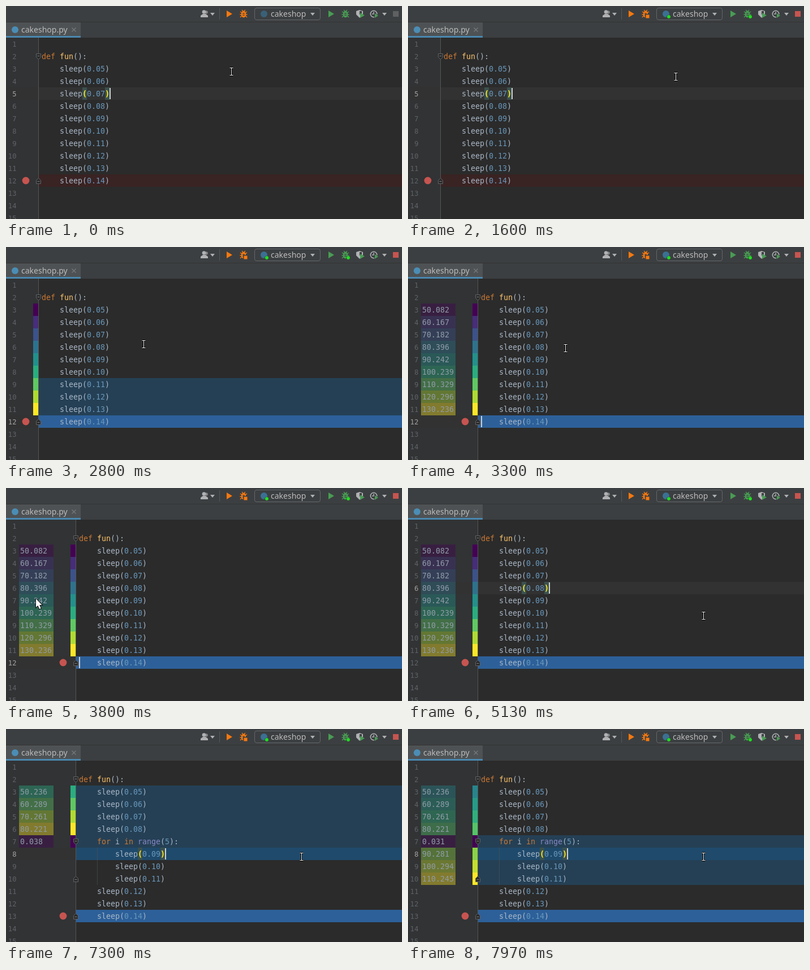
An HTML page with a canvas that plays this animation: 700 px wide and 377 px high, repeating every 8000 ms.

```html
<!DOCTYPE html>
<html lang="en">
<head>
<meta charset="utf-8">
<title>Editor with live line timings</title>
<style>
html, body { margin: 0; width: 100%; height: 100%; overflow: hidden; background: #2b2b2b; }
canvas { display: block; }
</style>
</head>
<body>
<canvas id="stage" width="700" height="377"></canvas>
<script>
const ctx = document.getElementById('stage').getContext('2d');
const LOOP = 8000, ROW = 22, CHAR = 8, GLOW = 500;
const MONO = '"DejaVu Sans Mono", monospace', UI = '"Noto Sans", sans-serif';
const VIRIDIS = ['#440154', '#472d7b', '#3b528b', '#2c728e', '#21918c', '#28ae80', '#5ec962', '#addc30', '#fde725'];
const WORDS = { def: '#cc7832', for: '#cc7832', in: '#cc7832', fun: '#ffc66d', range: '#8888c6' };
const GREY = '#afb1b3', ORANGE = '#f6790f', GREEN = '#499c54', RED = '#c75450';

// Moments of the session, in ms
const T = { debug: 1130, pause: 2700, labels: 3050, newline: 5170, loop: 5330, select: 5570,
  error: 5830, indent: 5930, folds: 6030, valid: 6170, deselect: 6430, resume: 7000 };

// time, row, column
const CARET = [[0, 5, 15], [T.pause, 12, 0], [4500, 8, 15], [5000, 7, 15], [5100, 6, 15], [T.newline, 7, 4],
  [T.loop, 7, 22], [T.select, 10, 15], [T.indent, 10, 19], [6200, 9, 19], [6270, 8, 19]];

// time, x, y
const MOUSE = [[30, 398, 116], [800, 420, 14], [1030, 420, 14], [1600, 473, 125], [2480, 473, 125],
  [2800, 243, 172], [3100, 226, 176], [3500, 330, 182], [3630, 53, 196], [3900, 53, 196], [4330, 522, 226]];

const rowTop = n => 56 + ROW * (n - 1);
const lastBefore = (keys, t) => keys.filter(k => k[0] <= t).pop() || keys[0];

// Turns [row, duration] pairs into a schedule
function schedule(start, steps) {
  return steps.map(([row, ms]) => {
    const step = { row, ms, start, end: start + ms };
    start += ms;
    return step;
  });
}
const firstRun = schedule(1870, [50.082, 60.167, 70.182, 80.396, 90.242, 100.239, 110.329, 120.296, 130.236]
  .map((ms, i) => [i + 3, ms]));
const secondRun = schedule(T.resume, [[3, 50.236], [4, 60.289], [5, 70.261], [6, 80.221],
  [7, 0.038], [8, 90.263], [9, 100.251], [10, 110.272],
  [7, 0.034], [8, 90.254], [9, 100.294], [10, 110.245],
  [7, 0.031], [8, 90.281], [9, 100.266], [10, 110.258]]);

function rect(x, y, w, h, color) {
  ctx.fillStyle = color;
  ctx.fillRect(x, y, w, h);
}
function disc(x, y, r, color) {
  ctx.fillStyle = color;
  ctx.beginPath();
  ctx.arc(x, y, r, 0, 7);
  ctx.fill();
}
function trace(points, close) {
  ctx.beginPath();
  points.forEach(([x, y]) => ctx.lineTo(x, y));
  if (close) ctx.closePath();
}
function poly(points, color) {
  trace(points, true);
  ctx.fillStyle = color;
  ctx.fill();
}
function line(points, color, width = 1) {
  trace(points);
  ctx.strokeStyle = color;
  ctx.lineWidth = width;
  ctx.stroke();
}
function text(str, x, y, color, font) {
  ctx.font = font;
  ctx.fillStyle = color;
  ctx.fillText(str, x, y);
}
const play = (x, y, w, h, color) => poly([[x, y], [x + w, y + h / 2], [x, y + h]], color);
const chevron = (x, y) => poly([[x - 4, y - 2], [x + 4, y - 2], [x, y + 3]], GREY);

function heat(v) {
  const f = Math.min(v, 0.9999) * 8, i = Math.floor(f);
  const part = (hex, k) => parseInt(hex.substr(1 + 2 * k, 2), 16);
  return [0, 1, 2].map(k => Math.round(part(VIRIDIS[i], k) + (f - i) * (part(VIRIDIS[i + 1], k) - part(VIRIDIS[i], k))));
}

function bug(x, color) {
  for (const s of [-1, 1]) {
    line([[x + s * 3, 12], [x + s * 6, 10]], color, 1.5);
    line([[x + s * 3, 15], [x + s * 6.5, 15]], color, 1.5);
    line([[x + s * 3, 17], [x + s * 6, 20]], color, 1.5);
    line([[x + s, 9], [x + s * 3, 7]], color, 1.3);
  }
  ctx.fillStyle = color;
  ctx.beginPath();
  ctx.ellipse(x, 14.5, 4.2, 6, 0, 0, 7);
  ctx.fill();
  rect(x - 2, 12.5, 4, 1.2, '#3c3f41');
  rect(x - 2, 15.5, 4, 1.2, '#3c3f41');
}

function runningDot(x) {
  disc(x, 19, 3.6, '#3c3f41');
  disc(x, 19, 2.9, '#1fe01f');
}

function drawToolbar(running, hover) {
  rect(0, 0, 700, 56, '#3c3f41');
  rect(0, 28, 700, 1, '#323232');

  disc(354, 11, 2.8, '#87898b');
  disc(350, 10.5, 3.3, GREY);
  poly([[344, 20], [344, 17], [348, 14], [353, 14], [357, 17], [357, 20]], GREY);
  chevron(365, 14);
  rect(377, 4, 1, 20, '#555759');

  play(390, 8, 10, 12, ORANGE);
  if (hover) {
    ctx.fillStyle = '#4c5052';
    ctx.beginPath();
    ctx.roundRect(409, 3, 22, 22, 3);
    ctx.fill();
  }
  bug(420, ORANGE);
  if (running) {
    rect(419, 14, 8, 8, '#3c3f41');
    rect(420.5, 15.5, 6, 6, ORANGE);
  }

  ctx.beginPath();
  ctx.roundRect(439.5, 3.5, 116, 21, 3.5);
  ctx.strokeStyle = '#646668';
  ctx.lineWidth = 1;
  ctx.stroke();
  disc(456, 14, 6, running ? '#3b7093' : '#3a6078');
  text('cakeshop', 468, 19, '#bbbbbb', '14px ' + UI);
  chevron(542, 14);

  play(570, 8, 10, 12, GREEN);
  bug(600, GREEN);
  if (running) {
    runningDot(461);
    runningDot(605);
  }

  poly([[619, 9], [625, 7], [631, 9], [631, 14], [625, 21], [619, 15]], GREY);
  rect(625, 9, 4, 6, '#3c3f41');
  play(626, 12, 8, 9, GREEN);

  ctx.beginPath();
  ctx.arc(650, 14, 5.7, 0, 7);
  ctx.strokeStyle = GREY;
  ctx.lineWidth = 1.6;
  ctx.stroke();
  line([[650, 10], [650, 14], [647, 14]], GREY, 1.4);
  play(651, 12, 8, 9, '#3c3f41');
  play(652, 13, 6, 8, GREEN);
  chevron(669, 14);
  rect(684, 9, 10, 10, running ? RED : '#5e6062');
}

function drawTab(invalid) {
  rect(0, 29, 132, 27, '#4e5254');
  rect(0, 53, 132, 3, '#4a88b0');
  disc(16, 42, 6, '#4b8db5');
  text('cakeshop.py', 27, 47, '#bbbbbb', '14px ' + UI);
  line([[116.5, 38.5], [123.5, 45.5]], '#75797b', 1.2);
  line([[123.5, 38.5], [116.5, 45.5]], '#75797b', 1.2);
  if (invalid) {
    const wave = Array.from({ length: 42 }, (_, i) => [27 + 2 * i, 49.5 + 2 * (i % 2)]);
    line(wave, '#bc3f3c');
  }
}

function sourceLines(t) {
  const lines = ['', 'def fun():'];
  for (let n = 5; n <= 14; n++) {
    if (n === 9 && t >= T.newline) lines.push(t >= T.loop ? '    for i in range(5):' : '');
    const deep = t >= T.indent && n >= 9 && n <= 11;
    lines.push((deep ? '        ' : '    ') + `sleep(${(n / 100).toFixed(2)})`);
  }
  return lines;
}

function drawCode(str, x, y, matched) {
  const font = '13.29px ' + MONO;
  for (const m of str.matchAll(/[a-z]+|[\d.]+|\S/g)) {
    const px = x + m.index * CHAR, paren = matched && /[()]/.test(m[0]);
    if (paren) rect(px, y, CHAR, ROW, '#3b514d');
    const color = paren ? '#ffef28' : WORDS[m[0]] || (/\d/.test(m[0]) ? '#6897bb' : '#a9b7c6');
    text(m[0], px, y + 16, color, (paren ? 'bold ' : '') + font);
  }
}

function foldMark(x, row, opens) {
  const y = rowTop(row) + 11.5, s = opens ? 1 : -1;
  const shape = [[x - 4, y - 5 * s], [x + 4, y - 5 * s], [x + 4, y + s], [x, y + 5 * s], [x - 4, y + s]];
  poly(shape, '#2b2b2b');
  line([...shape, shape[0]], '#606366');
  line([[x - 2, y - s], [x + 2, y - s]], '#7a7d80');
}

function drawEditor(t) {
  const wide = t >= T.labels, edge = wide ? 123 : 57, codeX = edge + 6;
  const [, caretRow, caretCol] = lastBefore(CARET, t);
  const selecting = t >= T.select && t < T.deselect;
  const lines = sourceLines(t), stopRow = t >= T.newline ? 13 : 12;
  const steps = t >= T.resume ? secondRun : firstRun;
  const xAt = col => codeX + col * CHAR;

  rect(0, 56, 700, 321, '#2b2b2b');
  rect(0, 56, edge, 321, '#313335');
  rect(0, rowTop(caretRow), 700, ROW, '#323232');

  for (const s of steps) {
    if (t >= s.start && t < s.start + GLOW) {
      rect(edge + 1, rowTop(s.row), 700, ROW, s.row === caretRow ? '#1f4a6c' : '#254055');
    }
  }
  rect(edge + 1, rowTop(stopRow), 700, ROW, t >= T.pause ? '#2d6099' : '#3a2323');

  if (selecting) {
    const indent = t >= T.indent ? 8 : 4;
    rect(xAt(indent), rowTop(8), 700, ROW, '#214283');
    rect(codeX, rowTop(9), 700, ROW, '#214283');
    rect(codeX, rowTop(10), (indent + 11) * CHAR, ROW, '#214283');
  }
  if (t >= T.indent) rect(xAt(4), rowTop(8), 1, 3 * ROW, 'rgba(80,84,88,.55)');
  rect(edge, 56, 1, 321, '#555555');

  const times = new Map(steps.filter(s => s.end <= t).map(s => [s.row, s.ms]));
  const low = Math.min(...times.values()), high = Math.max(...times.values());
  for (const [row, ms] of times) {
    const rgb = heat(high > low ? (ms - low) / (high - low) : 0).join();
    const y = rowTop(row);
    rect(edge - 9, y, 9, ROW, `rgb(${rgb})`);
    if (wide) {
      rect(23, y, 61, ROW, `rgba(${rgb},.4)`);
      text(ms.toFixed(3), 25, y + 16, '#8f9ba8', '13.29px ' + MONO);
    }
  }

  ctx.textAlign = 'right';
  for (let n = 1; n <= 15; n++) {
    text(n, 18.5, rowTop(n) + 16, n === caretRow ? '#a4a3a3' : '#606366', '12.2px ' + MONO);
  }
  ctx.textAlign = 'left';

  disc(edge - 22, rowTop(stopRow) + 11, 6.4, RED);
  foldMark(edge + 0.5, 2, true);
  foldMark(edge + 0.5, stopRow, false);
  if (t >= T.folds) {
    foldMark(edge + 0.5, 7, true);
    foldMark(edge + 0.5, 10, false);
  }

  lines.forEach((str, i) => {
    const matched = i + 1 === caretRow && !selecting && str[caretCol - 1] === ')';
    drawCode(str, codeX, rowTop(i + 1), matched);
  });

  const blink = t >= 130 && t < 630, hidden = t >= T.pause && t < T.labels;
  if (!blink && !hidden) rect(xAt(caretCol), rowTop(caretRow) + 1, 2, ROW - 2, '#d0d0d0');
  if (t >= T.error && t < 6530) rect(699, 66, 1, 5, RED);
}

function mouseAt(t) {
  const a = lastBefore(MOUSE, t), b = MOUSE[MOUSE.indexOf(a) + 1];
  if (!b || t <= a[0]) return [a[1], a[2]];
  const u = (t - a[0]) / (b[0] - a[0]), e = u * u * (3 - 2 * u);
  return [a[1] + (b[1] - a[1]) * e, a[2] + (b[2] - a[2]) * e];
}

function drawMouse(x, y, edge) {
  ctx.save();
  ctx.translate(Math.round(x), Math.round(y));
  if (y > 56 && x > edge) {
    for (const [color, w] of [['#000', 3], ['#fff', 1]]) {
      line([[0.5, -6], [0.5, 6]], color, w);
      for (const end of [-6.5, 6.5]) line([[-2.5, end], [3.5, end]], color, w);
    }
  } else {
    const arrow = [[0, 0], [0, 15], [3.5, 12], [6, 18], [8.7, 17], [6.2, 11], [10.5, 11]];
    line([...arrow, arrow[0]], '#111', 2);
    poly(arrow, '#fff');
  }
  ctx.restore();
}

function draw(t) {
  const [x, y] = mouseAt(t);
  drawToolbar(t >= T.debug, Math.abs(x - 420) < 11 && y < 25);
  drawTab(t >= T.error && t < T.valid);
  drawEditor(t);
  drawMouse(x, y, t >= T.labels ? 123 : 57);
}

const began = performance.now();
function tick() {
  draw((performance.now() - began) % LOOP);
  requestAnimationFrame(tick);
}
tick();
</script>
</body>
</html>
```
